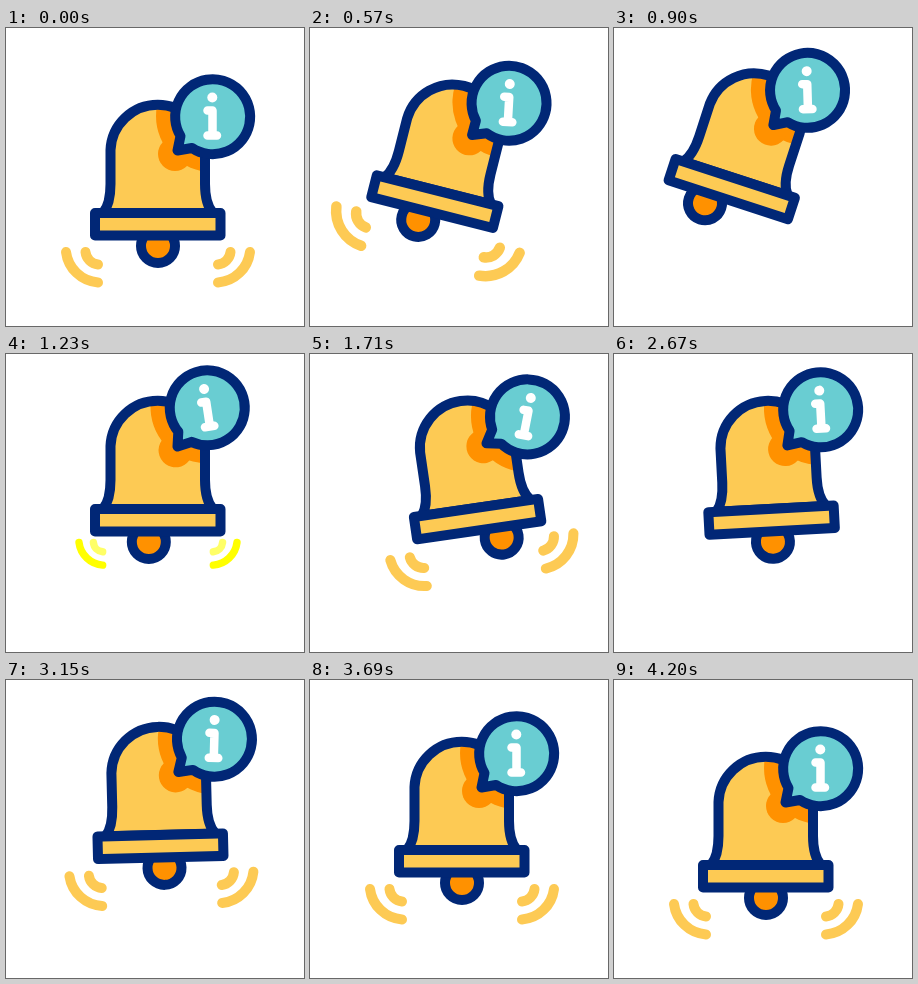
An HTML page for the animation above (4.23 s loop, 298 by 298 pixels).

```html
<!DOCTYPE html>
<html lang="en">
<head>
<meta charset="utf-8">
<title>Ringing bell</title>
<style>
  html, body { margin: 0; width: 100%; height: 100%; overflow: hidden; background: #fff; }
  svg { display: block; width: 100vw; height: 100vh; }
  .line { stroke: #012776; stroke-width: 10; stroke-linejoin: round; }
  .gold { fill: #fdca54; }
  .orange { fill: #ff9100; }
  .teal { fill: #69cdd2; }
  .letter { fill: none; stroke: #fff; stroke-width: 8.5; stroke-linecap: round; stroke-linejoin: round; }
  .wave { fill: none; stroke-width: 10; stroke-linecap: round; }
</style>
</head>
<body>
<svg viewBox="0 0 298 298">
  <defs>
    <path id="body" d="M97 185Q104.5 176 104.5 156V122A47.3 47.3 0 0 1 199 122V156Q199 176 207 185Z"/>
    <clipPath id="inside"><use href="#body"/></clipPath>
    <g id="arcs">
      <path class="wave" d="M60 224A35 35 0 0 0 92 254.5"/>
      <path class="wave inner" d="M79.5 224A14 14 0 0 0 92 236.5"/>
    </g>
  </defs>
  <g id="bell">
    <g id="waves">
      <g class="side"><use href="#arcs"/></g>
      <g transform="translate(304 0) scale(-1 1)"><g class="side"><use href="#arcs"/></g></g>
    </g>
    <circle id="clapper" class="line orange" cx="152" cy="218" r="17"/>
    <use href="#body" class="gold"/>
    <g clip-path="url(#inside)">
      <g class="tilt orange">
        <circle cx="206" cy="88" r="56"/>
        <circle cx="169" cy="126" r="17"/>
      </g>
    </g>
    <use href="#body" class="line" fill="none"/>
    <rect class="line gold" x="89" y="185" width="125.5" height="22.5"/>
    <g class="tilt">
      <path class="line teal" d="M174.5 108A37.5 37.5 0 1 1 186 120L171.5 122.5Z"/>
      <circle cx="206.3" cy="69.5" r="5" fill="#fff"/>
      <path class="letter" d="M201.5 82.5H206.5V107.5M201.5 107.5H211"/>
    </g>
  </g>
</svg>
<script>
const LOOP = 4230, STEP = 30;
const $ = id => document.getElementById(id);
const tilts = document.querySelectorAll('.tilt');
const sides = document.querySelectorAll('.side');
const inner = document.querySelector('.inner');

// Smooth curve through [time, value] keys, flat at every turning point.
function track(keys) {
  const slopes = keys.map((k, i) => {
    if (!i || i === keys.length - 1) return 0;
    const [a, b] = [keys[i - 1], keys[i + 1]];
    const left = (k[1] - a[1]) / (k[0] - a[0]);
    const right = (b[1] - k[1]) / (b[0] - k[0]);
    return left * right > 0 ? 2 * left * right / (left + right) : 0;
  });
  return t => {
    const last = keys.length - 1;
    if (t >= keys[last][0]) return keys[last][1];
    const i = Math.max(0, keys.findIndex(k => k[0] > t) - 1);
    const [t0, v0] = keys[i], [t1, v1] = keys[i + 1];
    const d = t1 - t0, p = Math.max(0, (t - t0) / d), q = 1 - p;
    return v0 * q * q * (1 + 2 * p) + v1 * p * p * (1 + 2 * q)
      + d * p * q * (slopes[i] * q - slopes[i + 1] * p);
  };
}

const lift = track([[0, 0], [960, -30], [3180, -30], [4200, 0]]);
const swing = track([[0, 0], [570, 14.2], [820, 19.5], [1230, 0], [1580, -12],
  [1710, -8.3], [2100, 10], [2250, 7.6], [2780, -4], [3400, 0]]);
const lag = track([[0, 0], [570, -11], [850, -20], [1230, -8.5], [1690, 19.5],
  [2230, -18.8], [2900, 7], [3150, 3], [3400, 0]]);

// Each burst of waves: visible from, to, and its size over time.
const bursts = [
  { from: 0, to: 890, size: track([[0, 1], [570, 1.05], [890, 1.22]]) },
  { from: 1200, to: 2190, size: track([[1170, 0.6], [1230, 0.74], [1500, 1], [1710, 1.01], [2190, 1.22]]) },
  { from: 2820, to: LOOP, size: track([[2790, 0.6], [2850, 0.74], [3120, 1]]) }
];
const FADE = 60;

function draw(t) {
  $('bell').setAttribute('transform',
    `translate(0 ${lift(t)}) rotate(${swing(t)} 152 86.5)`);
  const r = lag(t);
  tilts.forEach(el => el.setAttribute('transform', `rotate(${r} 171.5 122.5)`));
  $('clapper').setAttribute('cx', 152 + r * 1.08);

  const burst = bursts.find(b => t >= b.from && t < b.to);
  $('waves').style.display = burst ? '' : 'none';
  if (!burst) return;
  const s = burst.size(t);
  sides.forEach(el => el.setAttribute('transform',
    `translate(110 203) scale(${s}) translate(-110 -203)`));
  const faded = (burst.from > 0 && t - burst.from < FADE)
    || (burst.to < LOOP && burst.to - t <= STEP);
  $('arcs').setAttribute('stroke', faded ? '#ff0' : '#fdca54');
  inner.setAttribute('opacity', faded ? 0.6 : 1);
}

const start = performance.now();
function tick() {
  const t = (performance.now() - start) % LOOP;
  draw(Math.floor(t / STEP) * STEP);
  requestAnimationFrame(tick);
}
draw(0);
requestAnimationFrame(tick);
</script>
</body>
</html>
```
